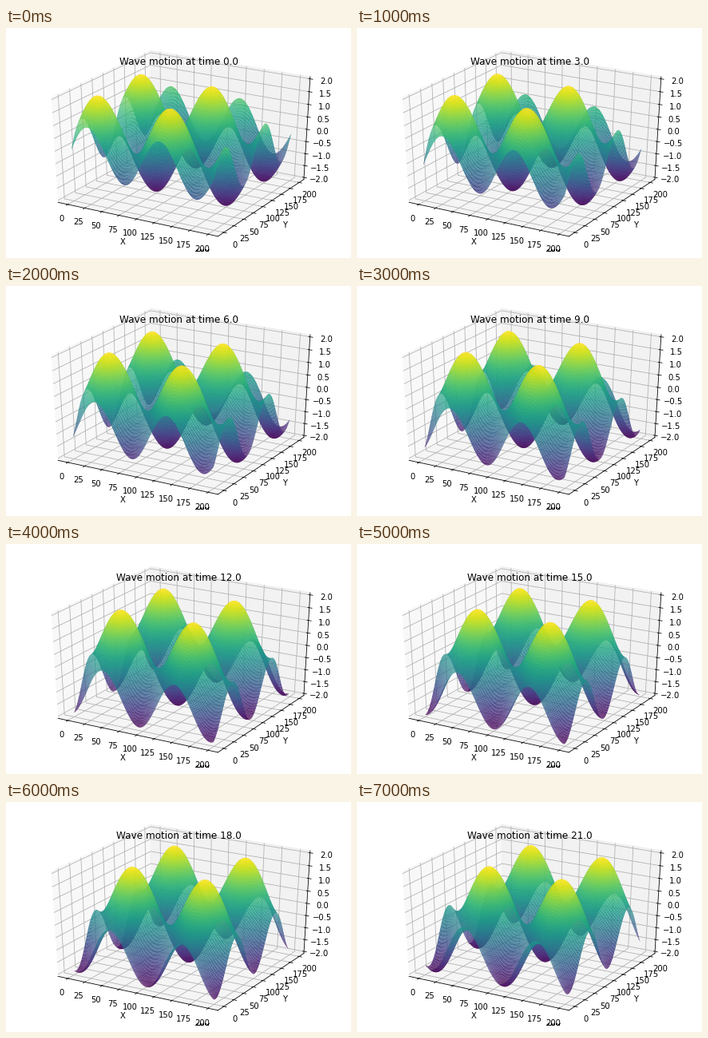
Recreate the animation shown at these times as a matplotlib script. Size 432x288 px, loop 8 s.

```python
import numpy as np
import matplotlib.pyplot as plt
from matplotlib.animation import FuncAnimation
from matplotlib.transforms import Bbox
from mpl_toolkits.mplot3d import Axes3D

WIDTH, HEIGHT, DPI = 432, 288, 72
PAD = 10.8            # margin around the axes in pixels
STEPS, TIME_STEP = 8, 3.0
WAVELENGTH, PERIOD = 100, 60


class WideAxes(Axes3D):
    """3D axes that fill their whole rectangle instead of a square."""

    def apply_aspect(self, position=None):
        pass

    def draw(self, renderer):
        super().draw(renderer)
        # The part of the last label below the axes is overprinted.
        label = self.xaxis.get_major_ticks()[-1].label1
        label.set_clip_box(Bbox.from_extents(0, 0, WIDTH, PAD))
        label.set_clip_on(True)
        for _ in range(12):
            label.draw(renderer)
        label.set_clip_on(False)


def padded(low, high):
    pad = (high - low) / 48
    return low - pad, high + pad


def wave(pos, t):
    return np.sin(2 * np.pi * (pos / WAVELENGTH - t / PERIOD))


grid = np.arange(200)
X, Y = np.meshgrid(grid, grid)

fig = plt.figure(figsize=(WIDTH / DPI, HEIGHT / DPI), dpi=DPI)
ax = WideAxes(fig, [PAD / WIDTH, PAD / HEIGHT,
                    1 - 2 * PAD / WIDTH, 1 - 2 * PAD / HEIGHT])
fig.add_axes(ax)

# Cube with sides of 25/24, after undoing the built-in scaling
ax.set_box_aspect((1, 1, 1), zoom=np.sqrt(3) / 1.8294640721620434)
ax.view_init(elev=30, azim=-60)

ax.set_xticks(np.arange(0, 201, 25))
ax.set_yticks(np.arange(0, 201, 25))
ax.set_zticks(np.arange(-2, 2.1, 0.5))
ax.set_xlim(*padded(-9.95, 208.95))
ax.set_ylim(*padded(-9.95, 208.95))
ax.set_zlim(*padded(-2, 2))
ax.set_xlabel("X")
ax.set_ylabel("Y")


def update(step):
    t = step * TIME_STEP
    for surface in list(ax.collections):
        surface.remove()
    ax.plot_surface(X, Y, wave(X, t) + wave(Y, t), rstride=1, cstride=1,
                    cmap="viridis", linewidth=0)
    ax.set_title(f"Wave motion at time {t:.1f}", y=0.92)
    return []


anim = FuncAnimation(fig, update, frames=STEPS, interval=1000, repeat=True)
plt.show()
```
